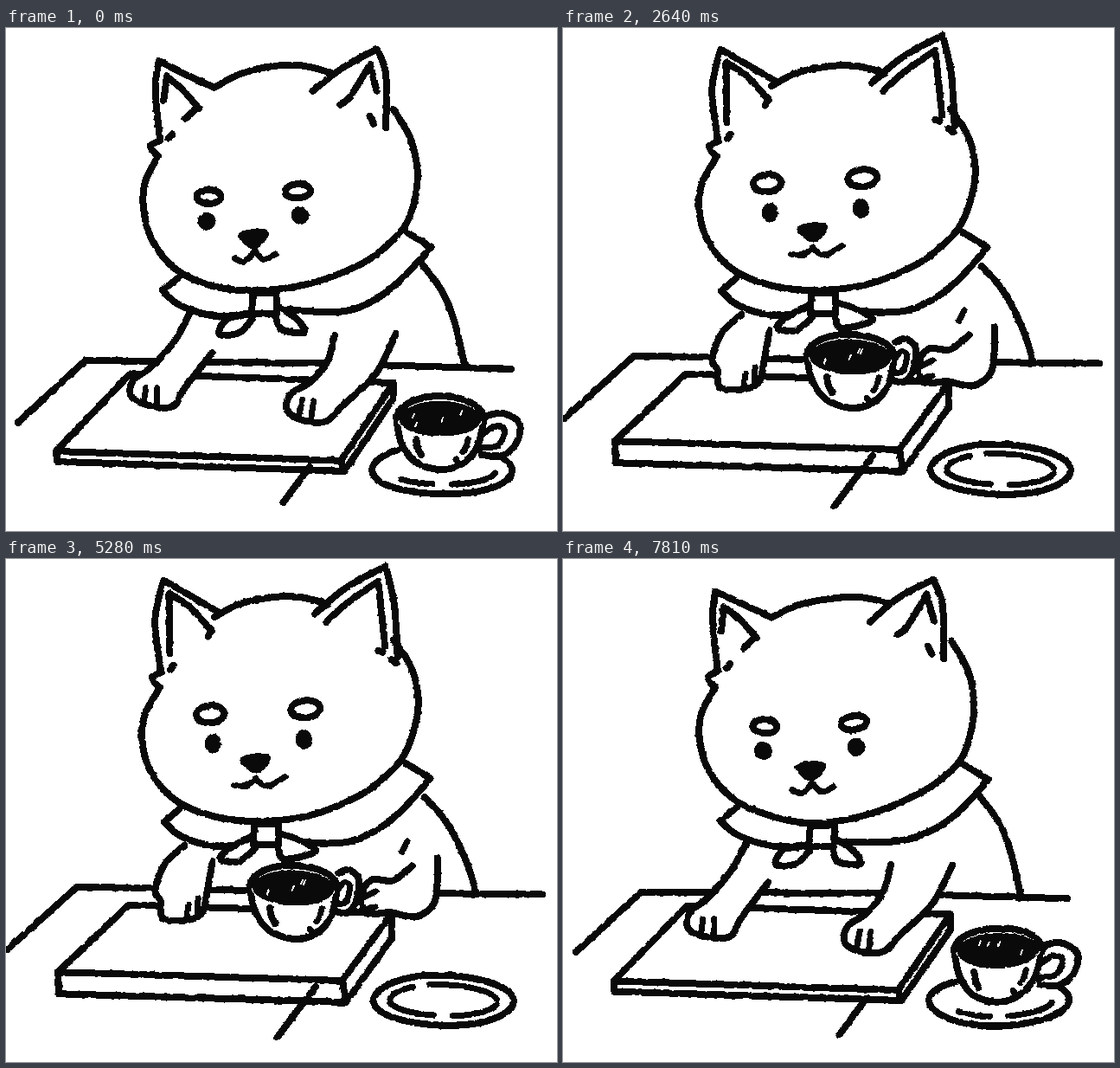
An HTML page that plays this animation: 637x581 px, repeating every 7.92 s.

```html
<!DOCTYPE html>
<html lang="en">
<head>
<meta charset="utf-8">
<title>Dog with coffee</title>
<style>
html, body { margin: 0; width: 100%; height: 100%; overflow: hidden; background: #fff; }
svg { display: block; width: 637px; height: 581px; }
path { stroke-linecap: round; stroke-linejoin: round; }
</style>
</head>
<body>
<svg viewBox="0 0 637 581">
  <filter id="rough" filterUnits="userSpaceOnUse" x="0" y="0" width="637" height="581" color-interpolation-filters="sRGB">
    <feTurbulence id="noise" type="fractalNoise" baseFrequency=".16" numOctaves="1" result="n"/>
    <feDisplacementMap in="SourceGraphic" in2="n" scale="3" xChannelSelector="R" yChannelSelector="G"/>
    <feComponentTransfer>
      <feFuncR type="discrete" tableValues=".04 1"/>
      <feFuncG type="discrete" tableValues=".04 1"/>
      <feFuncB type="discrete" tableValues=".04 1"/>
    </feComponentTransfer>
  </filter>
  <g filter="url(#rough)">
    <rect width="637" height="581" fill="#fff"/>
    <g id="art"></g>
  </g>
</svg>
<script>
const STEP = 110, COUNT = 72;
const art = document.getElementById('art');
const noise = document.getElementById('noise');
const white = { fill: '#fff' };
let m = 0, out = [];

const lerp = (a, b, u) => a + (b - a) * u;
const rand = n => { const v = Math.sin(n * 12.9898) * 43758.5453; return v - Math.floor(v); };
const ease = (from, to) => {
  const u = Math.max(0, Math.min(1, (m - from) / (to - from)));
  return u * u * (3 - 2 * u);
};

// "x y, x y!, ..." where "!" marks a sharp corner
const P = s => s.split(',').map(q => {
  const [x, y] = q.trim().split(' ').map(parseFloat);
  return { x, y, corner: q.includes('!') };
});
const blend = (a, b, u) => {
  const to = P(b);
  return P(a).map((q, i) => ({ ...q, x: lerp(q.x, to[i].x, u), y: lerp(q.y, to[i].y, u) }));
};
const shift = (pts, dx, dy) => pts.map(q => ({ ...q, x: q.x + dx, y: q.y + dy }));

// Monotone spline through values at given times; it does not stop at inner keys.
function track(times, values) {
  const last = times.length - 1;
  if (m <= times[0]) return values[0];
  if (m >= times[last]) return values[last];
  const i = times.findIndex(t => t > m) - 1;
  const rate = j => (values[j + 1] - values[j]) / (times[j + 1] - times[j]);
  const slope = j => {
    if (j === 0 || j === last) return 0;
    const a = rate(j - 1), b = rate(j);
    return a * b > 0 ? 2 * a * b / (a + b) : 0;
  };
  const h = times[i + 1] - times[i], u = (m - times[i]) / h, e = u * u * (3 - 2 * u);
  return lerp(values[i], values[i + 1], e)
    + h * u * (1 - u) * ((1 - u) * slope(i) - u * slope(i + 1));
}
function poses(times, list) {
  const all = list.map(P);
  return all[0].map((q, i) => ({
    x: track(times, all.map(a => a[i].x)),
    y: track(times, all.map(a => a[i].y))
  }));
}

// Each step is redrawn with a slightly unsteady hand.
const wobble = q => ({
  ...q,
  x: q.x + Math.sin(m * 5.1 + q.y * .035),
  y: q.y + Math.sin(m * 3.7 + q.x * .035)
});

function ink(pts, { w = 8, fill = 'none', stroke = '#000', close = false, line = false } = {}) {
  const p = (typeof pts === 'string' ? P(pts) : pts).map(wobble), n = p.length;
  const at = i => close ? p[(i + n) % n] : p[Math.max(0, Math.min(i, n - 1))];
  const reach = (i, k) => {
    const q = at(i), f = line || q.corner ? 0 : k / 6;
    return `${q.x + (at(i + 1).x - at(i - 1).x) * f} ${q.y + (at(i + 1).y - at(i - 1).y) * f} `;
  };
  let d = `M${p[0].x} ${p[0].y}`;
  for (let i = 0; i < (close ? n : n - 1); i++)
    d += `C${reach(i, 1)}${reach(i + 1, -1)}${at(i + 1).x} ${at(i + 1).y}`;
  out.push(`<path d="${d}${close ? 'Z' : ''}" fill="${fill}" stroke="${stroke}" stroke-width="${w}"/>`);
}

function arc(x, y, rx, ry, from, to, opt = {}, tilt = 0) {
  const n = 12, c = Math.cos(tilt), s = Math.sin(tilt), pts = [];
  for (let i = 0; i < n + !opt.close; i++) {
    const a = lerp(from, to, i / n) * Math.PI / 180;
    const ex = rx * Math.cos(a), ey = ry * Math.sin(a);
    pts.push({ x: x + ex * c - ey * s, y: y + ex * s + ey * c });
  }
  ink(pts, opt);
}
const oval = (x, y, rx, ry, opt, tilt) => arc(x, y, rx, ry, 0, 360, { ...opt, close: true }, tilt);
const blot = (x, y, rx, ry) => oval(x, y, rx, ry, { fill: '#000', w: 1 });

function table(up, hold) {
  ink(blend('14 455,91 384,370 387,583 393', '2 450,83 379,370 384,590 388', up)
    .map((q, i) => i < 3 ? q : { ...q, x: q.x + 31 * hold }), { line: true });

  const left = 488 - 11 * up, right = 499 - 13 * up, h = 12 + 13 * up;
  const side = 428 + 10 * up;
  ink(`143 400,447 410,388 ${right},59 ${left}`, { line: true, close: true });
  ink(`59 ${left},60 ${left + h},392 ${right + h},447 ${side},447 410`, { line: true });
  ink(`388 ${right},392 ${right + h}`);
  ink(blend('352 507,320 549', '357 493,314 553', up));
}

function leftArm() {
  ink(poses([16, 24, 34], [
    '213 329,195 361,168 391,146 408,144 426,163 436,192 437,205 416,238 374',
    '205 330,183 352,173 382,180 395,182 414,205 417,227 409,233 385,238 350',
    '218 332,190 360,175 385,180 402,195 408,215 404,236 382,248 372,254 366'
  ]), white);
}

function scarf(up) {
  ink('201 287,182 303!,203 320,243 332,280 330');
  ink('460 235,491 254!,455 293,424 315,387 327,322 326');
  ink(blend('283 331,256 336,247 353,270 352,286 336', '282 322,259 334,247 346,269 350,290 332', up), white);
  ink(blend('312 332,319 349,345 352,337 337,318 324', '314 333,321 347,357 337,340 325,317 318', up), white);
  ink('286 307,314 307,314 331,285 331', { ...white, line: true, close: true });
}

function head(up) {
  ink('177 148,161 178,158 207,167 243,195 277,239 297,290 304,350 296,410 272,441 250,461 228,473 195,476 163,468 127,448 94');
  ink('242 67,270 53,308 45,342 44,374 51');

  // Ears and fur
  ink(blend('179 129,172 72,176 38!,205 52,240 68', '178 128,173 70,183 24!,215 42,249 63', up));
  ink(blend('182 84,185 56!,204 71,223 92', '189 108,190 39!,215 56,238 83', up));
  ink(blend('354 73,387 46,428 24!,438 52,440 108', '358 63,393 33,439 9!,450 54,452 114', up));
  ink(blend('386 88,397 79,420 41!,428 72', '371 72,393 52,431 26!,438 102', up));
  ink(blend('218 94,208 104', '237 84,234 89', up));
  ink(blend('421 101,426 110', '430 106,435 108', up));
  ink(blend('439 102,440 115', '445 117,450 121', up));
  ink('179 130,168 137,176 148');
  ink('193 122,189 127');

  // Face
  oval(234 + 2 * up, 194 - 15 * up, 14 + 2 * up, 8 + 2 * up, {});
  oval(337 + 9 * up, 189 - 16 * up, 15 + 2 * up, 8 + 2 * up, {}, -.12);
  blot(231 + 9 * up, 222 - 9 * up, 10 - up, 10 + up);
  blot(339 + 6 * up, 217 - 9 * up, 10 - up, 10 + up);
  ink(shift(P('269 239,285 234,301 236,298 246,287 254,277 250'), 4 * up, -7 * up),
    { fill: '#000', w: 3, close: true });
  ink(blend('264 266,276 270,287 257!,298 268,312 262', '264 262,277 263,289 255!,303 263,323 252', up), { w: 7 });
  if (m >= 30) ink('280 264,290 271,300 264', { w: 6 });
}

function saucer(up, hold) {
  oval(505, 510, 81, 29, {});
  arc(505, 510, 62, 18, 140 + 95 * up, 100, { w: 7 });
  arc(505, 510, 62, 18, 80, 10, { w: 7 });
  if (hold > 0) arc(505, 510, 62, 18, 255, 355, { w: 7 });
}

function cup(up, hold) {
  const times = [17, 24, 34];
  const x = track(times, [502, 333, 298]), y = track(times, [450, 378, 322]);
  const on = (s, opt) => ink(shift(P(s), x, y), opt);
  const handle = (s, opt) => ink(P(s).map(q => ({
    x: x + lerp(q.x, 50 + (q.x - 50) * .6, hold), y: y + q.y - 14 * up
  })), opt);

  handle('52 -2,72 -6,92 6,88 30,70 44,49 42', white);
  handle('52 17,64 9,75 14,68 31,51 34', { ...white, w: 7 });
  on('-51 0,-44 30,-28 52,0 61,26 54,44 33,51 0', white);
  oval(x, y, 50, 22, { ...white, stroke: 'none' });
  arc(x, y, 50, 24, 180, 360);
  blot(x, y + 2, 47, 20);
  for (let i = 0; i < 4; i++) {
    const fx = (rand(m * 7 + i) - .5) * 60, fy = (rand(m * 13 + i + 50) - .5) * 20;
    on(`${fx} ${fy},${fx - 2} ${fy + 5}`, { stroke: '#fff', w: 2 });
  }
  on('-27 26,-25 36,-21 44');
  on('33 25,31 33,27 40', { w: 7 });
  on('19 49,20 50', { w: 7 });
}

function hands() {
  const lift = [16, 24, 34], reach = [9, 16, 24, 34];
  ink(poses(lift, ['161 416,159 430', '212 398,210 413', '230 352,254 352']), { w: 7 });
  ink(poses(lift, ['174 416,174 433', '223 391,222 408', '236 367,254 364']), { w: 7 });

  ink(poses(reach, [
    '380 354,371 384,351 409,328 424,325 443,345 454,370 454,388 436,427 398,451 353',
    '428 350,438 368,452 390,466 414,474 426,490 430,505 430,515 420,500 385,474 320',
    '470 355,448 372,425 370,413 382,412 398,420 410,445 409,475 414,497 395,498 345',
    '466 350,434 343,408 328,385 320,374 335,378 358,410 368,435 394,475 400,497 364'
  ]), white);
  ink(poses(reach, ['342 430,339 447', '488 402,485 426', '428 384,413 391', '391 336,374 338']), { w: 7 });
  ink(poses(reach, ['355 431,353 449', '500 402,501 428', '428 402,414 405', '391 350,376 353']), { w: 7 });
  if (m >= 20) ink('463 327,457 339', { w: 7 });
}

function draw(step) {
  m = Math.min(step, COUNT - step);   // plays forward, then back
  out = [];
  const up = ease(9, 16), hold = ease(17, 24);
  table(up, hold);
  ink(blend('480 272,505 305,519 340,529 388', '484 276,508 304,530 345,544 383', hold));
  leftArm();
  scarf(up);
  head(up);
  saucer(up, hold);
  cup(up, hold);
  hands();
  noise.setAttribute('seed', m + 1);
  art.innerHTML = out.join('');
}

const start = performance.now();
let last = -1;
function tick() {
  const step = Math.floor(Math.max(0, performance.now() - start) / STEP) % COUNT;
  if (step !== last) draw(last = step);
  requestAnimationFrame(tick);
}
tick();
</script>
</body>
</html>
```
